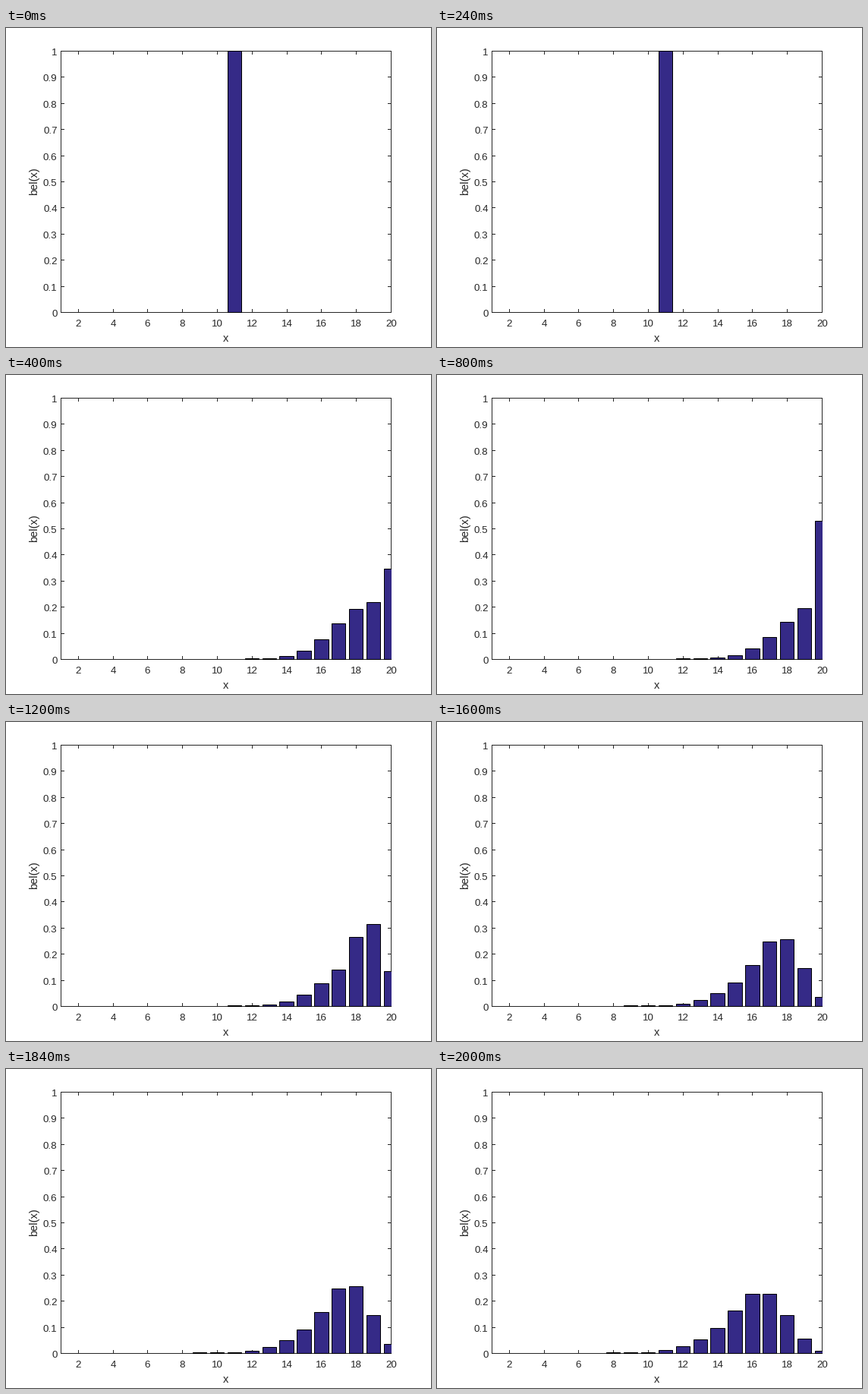
Recreate the animation shown at these times as a matplotlib script. Size 560 by 420 pixels, loop 2400 ms.

```python
import math

import matplotlib.pyplot as plt
import numpy as np
from matplotlib.animation import FuncAnimation
from matplotlib.patches import Rectangle

W, H, DPI = 560, 420, 100
PX = 72 / DPI                      # one pixel in points
LEFT, RIGHT, TOP, BOTTOM = 72, 507, 30, 374
CELLS = 20
STEP = (RIGHT - LEFT) / (CELLS - 1)
INK = "#262626"
FILL = "#352a87"

plt.rcParams["font.family"] = "Liberation Sans"


def forward(p):
    """Stay 25 %, one cell 50 %, two cells 25 %; the last cell holds its mass."""
    q = 0.25 * p
    q[1:] += 0.5 * p[:-1]
    q[2:] += 0.25 * p[:-2]
    q[-1] += 0.75 * p[-1]
    return q / q.sum()


def backward(p):
    return forward(p[::-1])[::-1]


def beliefs():
    p = np.zeros(CELLS)
    p[10] = 1
    out = [p]
    for _ in range(8):
        p = forward(p)
    out.append(p)
    for move in (forward, backward, backward, backward):
        p = move(p)
        out.append(p)
    return out


def col(v):
    return LEFT + 0.5 + (v - 1) * STEP


fig = plt.figure(figsize=(W / DPI, H / DPI), dpi=DPI, facecolor="white")
ax = fig.add_axes([0, 0, 1, 1])
ax.set_xlim(0, W)
ax.set_ylim(H, 0)
ax.axis("off")


def line(x0, y0, x1, y1):
    ax.plot([x0, x1], [y0, y1], color=INK, lw=PX, snap=False,
            solid_capstyle="butt", zorder=3)


def label(x, y, s, size, **kw):
    ax.text(x, y, s, fontsize=size * PX, color=INK, va="baseline", **kw)


# frame of the plot
for y in (TOP, BOTTOM):
    line(LEFT, y + 0.5, RIGHT + 1, y + 0.5)
for x in (LEFT, RIGHT):
    line(x + 0.5, TOP, x + 0.5, BOTTOM + 1)

# ticks and their labels
for v in range(2, CELLS + 1, 2):
    x = math.floor(col(v)) + 0.5
    line(x, TOP, x, TOP + 5)
    line(x, BOTTOM - 4, x, BOTTOM + 1)
    label(x, 393, str(v), 13.33, ha="center")
for k in range(11):
    y = math.floor(BOTTOM + 0.5 - (BOTTOM - TOP) * k / 10) + 0.5
    line(LEFT, y, LEFT + 5, y)
    line(RIGHT - 4, y, RIGHT + 1, y)
    label(67.5, y + 5.5, f"{k / 10:g}", 13.33, ha="right")

label(290, 413, "x", 14.67, ha="center")
label(41, 202, "bel(x)", 14.67, ha="center", rotation=90,
      rotation_mode="anchor")

# bars, cut off at the right side of the plot
clip = Rectangle((LEFT, TOP), RIGHT + 1 - LEFT, BOTTOM + 1 - TOP,
                 transform=ax.transData)
bars = []
for v in range(1, CELLS + 1):
    x0 = math.floor(col(v) - 0.4 * STEP)
    x1 = math.floor(col(v) + 0.4 * STEP)
    bar = Rectangle((x0 + 0.5, BOTTOM + 0.5), x1 - x0, 0, fc=FILL, ec="black",
                    lw=PX, snap=False, zorder=4)
    ax.add_patch(bar)
    bar.set_clip_path(clip)
    bars.append(bar)

STATES = beliefs()


def draw(i):
    for bar, p in zip(bars, STATES[i]):
        h = math.ceil((BOTTOM - TOP) * p - 0.012)
        bar.set_height(-h)
        bar.set_visible(h > 0)
    return bars


anim = FuncAnimation(fig, draw, frames=len(STATES), interval=400,
                     repeat=True, repeat_delay=0, blit=False)
plt.show()
```
